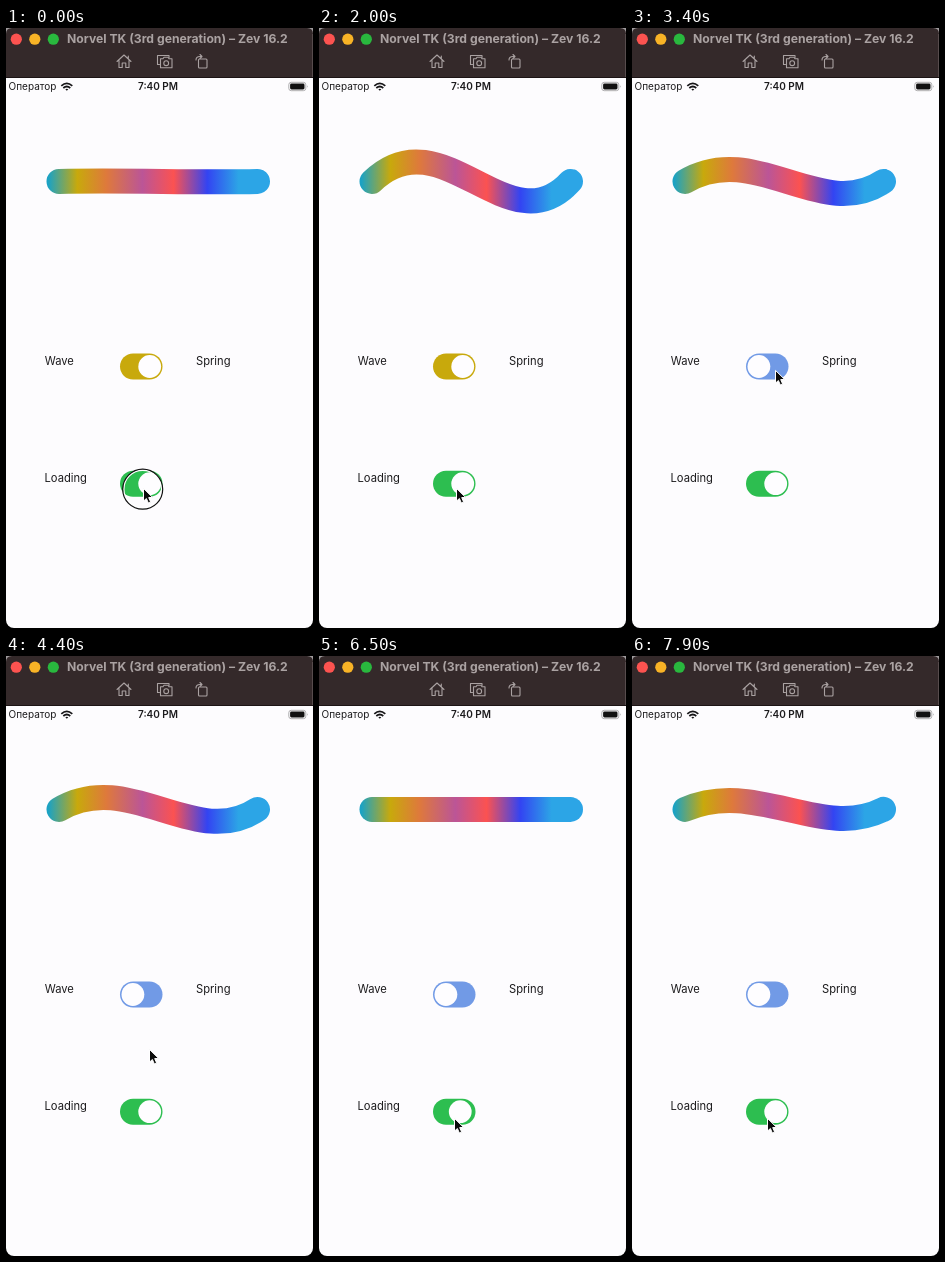
An HTML page for the animation above (8 s loop, 307 by 600 pixels).

```html
<!DOCTYPE html>
<html lang="en">
<head>
<meta charset="utf-8">
<title>Wave loader</title>
<style>
  html, body { margin: 0; width: 100%; height: 100%; overflow: hidden; background: #000; }
  svg { display: block; width: 100vw; height: 100vh; }
  text { font-family: Inter, Roboto, sans-serif; fill: #1c1b1d; }
  .title { font-size: 12.2px; font-weight: 700; fill: #aaa2a2; }
  .status { font-size: 10px; }
  .clock { font-weight: 600; text-anchor: middle; }
  .label { font-size: 11.2px; }
  .icon { fill: none; stroke: #aaa2a2; stroke-width: 1.1; stroke-linejoin: round; stroke-linecap: round; }
</style>
</head>
<body>
<svg viewBox="0 0 307 600">
  <defs>
    <linearGradient id="rainbow" gradientUnits="userSpaceOnUse" x1="40" y1="0" x2="264" y2="0">
      <stop offset="0.01" stop-color="#1ba2c4"/>
      <stop offset="0.14" stop-color="#c8a90c"/>
      <stop offset="0.27" stop-color="#de793c"/>
      <stop offset="0.43" stop-color="#bb5597"/>
      <stop offset="0.57" stop-color="#fb5251"/>
      <stop offset="0.72" stop-color="#3344f2"/>
      <stop offset="0.86" stop-color="#2ca5e6"/>
      <stop offset="1" stop-color="#2ca5e6"/>
    </linearGradient>
  </defs>

  <rect width="307" height="20" fill="#a09c9e"/>
  <rect y="20" width="307" height="580" rx="8" fill="#fdfcfe"/>
  <path d="M0 50V6Q0 0 6 0H301Q307 0 307 6V50Z" fill="#34292a"/>
  <path d="M306.5 6V49" stroke="#574c4d"/>
  <path d="M0 49.5H307" stroke="#1c1415"/>
  <circle cx="10.3" cy="11.2" r="5.6" fill="#fc5350"/>
  <circle cx="28.8" cy="11.2" r="5.6" fill="#f8b326"/>
  <circle cx="47.3" cy="11.2" r="5.6" fill="#29b83e"/>
  <text class="title" x="61" y="15.3">Norvel TK (3rd generation) – Zev 16.2</text>

  <g class="icon">
    <path d="M111 33.5L118 27L125 33.5M113 32.5V39.5H116.2V35H119.8V39.5H123V32.5M122.3 30.5V28"/>
    <path d="M153.5 36.5H151.5V27.5H163V29.5"/>
    <path d="M154.5 30.8H157L158 29.3H162L163 30.8H166V39.8H154.5Z"/>
    <circle cx="160.2" cy="35.2" r="2.4"/>
    <rect x="192.5" y="31" width="8.5" height="9" rx="1"/>
    <path d="M190 32Q190 28.5 194 28.5H196M194 26.5L196 28.5L194 30.5"/>
  </g>

  <text class="status" x="2.6" y="62">Оператор</text>
  <g fill="none" stroke="#161517" stroke-width="1.7">
    <path d="M55.3 57.8Q60.8 52.8 66.3 57.8M57.3 60Q60.8 57 64.3 60"/>
    <path d="M59.3 61.3Q60.8 60.2 62.3 61.3L60.8 62.8Z" fill="#161517" stroke="none"/>
  </g>
  <text class="status clock" x="152" y="62.3">7:40 PM</text>
  <rect x="282.8" y="54.3" width="17" height="8.4" rx="2.4" fill="none" stroke="#a6a5a8" stroke-width="0.9"/>
  <rect x="284.1" y="55.6" width="14.4" height="5.8" rx="1.4" fill="#111"/>
  <path d="M301 57.2Q302.5 58.5 301 59.8Z" fill="#a6a5a8"/>

  <path id="wave" fill="none" stroke="url(#rainbow)" stroke-width="25" stroke-linecap="round"/>

  <text class="label" x="38.7" y="336.8">Wave</text>
  <text class="label" x="190" y="336.8">Spring</text>
  <text class="label" x="38.5" y="454.2">Loading</text>

  <g id="mode" transform="translate(114 325.5)">
    <rect width="42.5" height="26" rx="13"/>
    <circle cy="13" r="11.4" fill="#fefdff"/>
  </g>
  <g id="loading" transform="translate(114 442.7)">
    <rect width="42.5" height="26" rx="13"/>
    <circle cy="13" r="11.4" fill="#fefdff"/>
  </g>

  <g id="press" fill="none">
    <circle cx="-0.3" cy="1.2" r="18.9" stroke="#fff" stroke-width="1.4"/>
    <circle cx="-0.3" cy="1.2" r="20" stroke="#111" stroke-width="1.2"/>
  </g>
  <path id="cursor" d="M0.5 0.4V13.1L3.4 10.5L5.3 14.9L7.6 13.9L5.7 9.6L9.6 9.4Z"
        fill="#0b0b0b" stroke="#fff" stroke-width="1"/>
</svg>

<script>
const LOOP = 8000;
const MODE_OFF = 3130, LOADING_OFF = 5190, LOADING_ON = 6290;
const SPRING_STARTS = [3233, 6500];
const PRESSES = [[0, 150], [3020, 3220], [5080, 5270], [6190, 6380]];
// time, x, y of the pointer tip
const POINTER = [
  [0, 137, 460], [2350, 137, 460], [2750, 143, 342], [4060, 143, 342],
  [4400, 143, 393], [4800, 135, 462], [7999, 135, 462]
];

const $ = id => document.getElementById(id);
const clamp = v => Math.min(1, Math.max(0, v));
const mix = (a, b, k) => a + (b - a) * k;
const progress = (t, start, span = 260) => clamp((t - start) / span);
const easeOut = k => 1 - (1 - k) ** 2;
const blend = (a, b, k) => `rgb(${a.map((v, i) => Math.round(mix(v, b[i], k)))})`;

function spring(s) {
  if (s < 0) return 0;
  return 12 * (1 - Math.exp(-0.84 * s) * Math.cos(3 * Math.PI * s));
}

function amplitude(t) {
  if (t >= LOADING_ON) return spring((t - SPRING_STARTS[1]) / 1000);
  if (t >= SPRING_STARTS[0]) return spring((t - SPRING_STARTS[0]) / 1000);
  if (t < 1000) return 0.5 * (1 - progress(t, 400, 300));
  return 9.75 * (1 - Math.cos(Math.PI * (t - 1000) / 1000));
}

function drawWave(t) {
  const shown = t < LOADING_OFF || t >= LOADING_ON;
  const pull = amplitude(t) * 2 * Math.sqrt(3);   // control offset for the wanted crest
  const y = 153.4;
  $('wave').setAttribute('d', `M53 ${y}C123 ${y - pull} 190 ${y + pull} 251.5 ${y}`);
  $('wave').setAttribute('visibility', shown ? 'visible' : 'hidden');
}

function drawSwitch(id, on, offColor, onColor) {
  const [track, knob] = $(id).children;
  track.setAttribute('fill', blend(offColor, onColor, clamp(on * 1.2)));
  knob.setAttribute('cx', mix(12.9, 29.7, on));
}

function drawPointer(t) {
  const i = POINTER.findLastIndex(p => p[0] <= t);
  const a = POINTER[i], b = POINTER[Math.min(i + 1, POINTER.length - 1)];
  const k = b === a ? 0 : (t - a[0]) / (b[0] - a[0]);
  const place = `translate(${mix(a[1], b[1], k)} ${mix(a[2], b[2], k)})`;
  $('cursor').setAttribute('transform', place);
  $('press').setAttribute('transform', place);
  const down = PRESSES.some(([from, to]) => t >= from && t < to);
  $('press').setAttribute('visibility', down ? 'visible' : 'hidden');
}

function draw(t) {
  drawWave(t);
  drawSwitch('mode', 1 - easeOut(progress(t, MODE_OFF)), [113, 154, 230], [200, 169, 12]);
  const loading = t < LOADING_ON
    ? 1 - easeOut(progress(t, LOADING_OFF))
    : easeOut(progress(t, LOADING_ON, 340));
  drawSwitch('loading', loading, [228, 227, 231], [45, 190, 80]);
  drawPointer(t);
}

let start;
function tick(now) {
  start ??= now;
  draw((now - start) % LOOP);
  requestAnimationFrame(tick);
}
draw(0);
requestAnimationFrame(tick);
</script>
</body>
</html>
```
